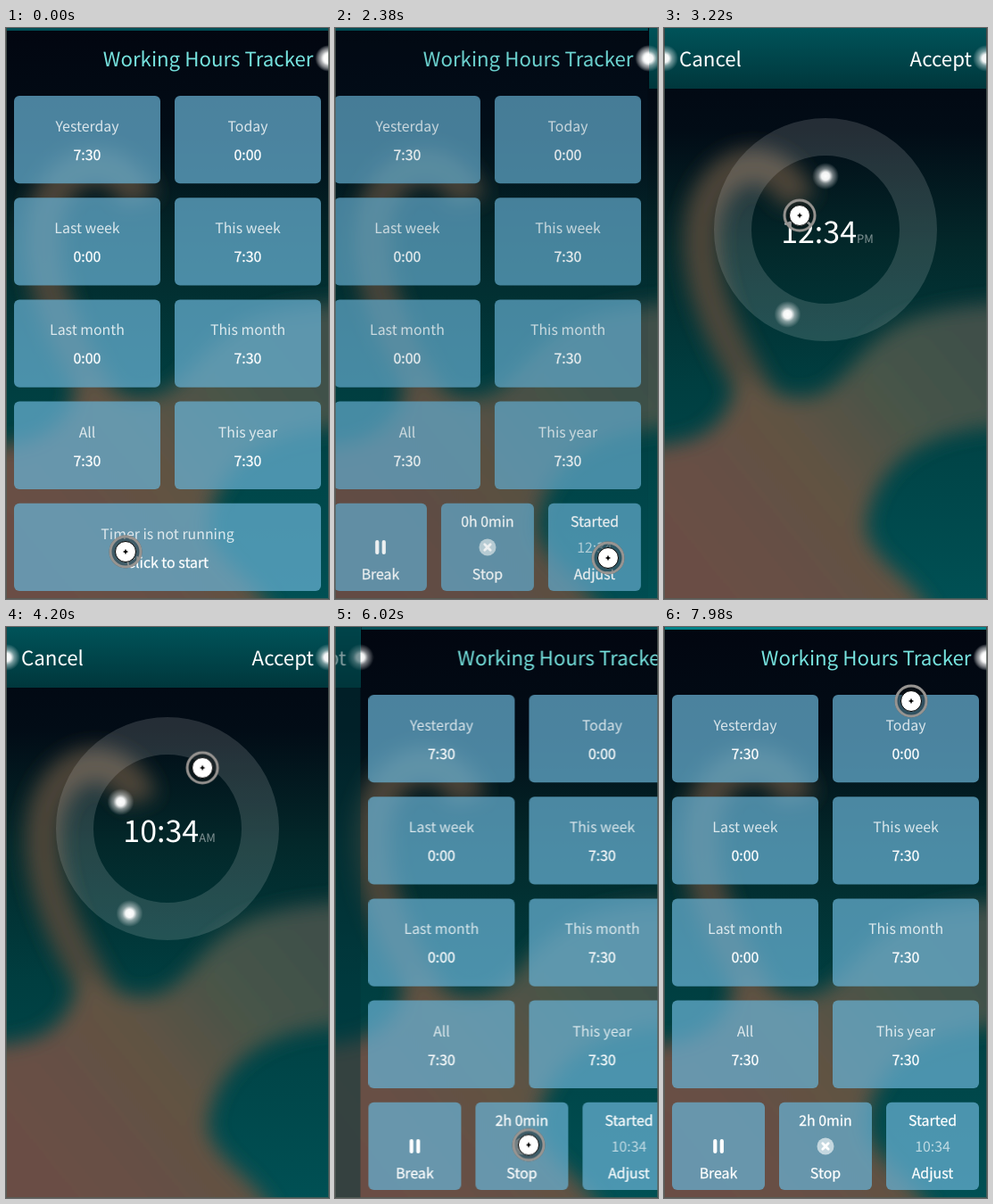
An HTML page for the animation above (8 s loop, 362 by 640 pixels).

```html
<!DOCTYPE html>
<html lang="en">
<head>
<meta charset="utf-8">
<title>Working Hours Tracker</title>
<style>
html, body { margin: 0; width: 100%; height: 100%; overflow: hidden; background: #02080f; }
svg { display: block; width: 362px; height: 640px; overflow: hidden; }
text { font-family: "Noto Sans CJK JP", "Noto Sans CJK SC", "Noto Sans CJK", "Open Sans", sans-serif; font-size: 15.9px; fill: #fff; text-rendering: geometricPrecision; }
.mid { text-anchor: middle; }
.end { text-anchor: end; }
.thin { font-weight: 300; fill-opacity: .8; }
.value { stroke: #fff; stroke-width: .25px; }
.dim { fill-opacity: .65; }
.head { font-size: 22.3px; font-weight: 300; }
.title { fill: #76e2de; }
.time { font-size: 34px; font-weight: 300; }
.ampm { font-size: 13px; fill-opacity: .5; }
.card { fill: rgba(104, 178, 212, .72); }
.press { fill: #00a0a8; fill-opacity: .45; }

/* One loop is 8 s: 1% = 80 ms */
#main, #dialog, .shade, #strip, #cursor { animation: 8s linear infinite; }
.idle, .run, .before, .after, .noon, .morning, .hour,
.press, #accept, .lit { animation: 8s step-end infinite; }

#main { animation-name: main; }
#dialog { animation-name: dialog; }
#main .shade { animation-name: shadeMain; }
#dialog .shade { animation-name: shadeDialog; }
#strip { animation-name: strip; }
#cursor { animation-name: cursor; }
.idle { animation-name: idle; }
.run { animation-name: run; }
.before { animation-name: before; }
.after { animation-name: after; }
.noon { animation-name: noon; }
.morning { animation-name: morning; }
.hour { animation-name: hour; }
.press.start { animation-name: pressStart; }
.press.adjust { animation-name: pressAdjust; }
#accept { animation-name: accept; }
.lit { animation-name: lit; }

@keyframes main {
  0% { transform: none; }
  29.06% { transform: translateX(0); animation-timing-function: cubic-bezier(.455, .03, .515, .955); }
  35.31% { transform: translateX(-362px); animation-timing-function: step-end; }
  50% { transform: translateX(362px); }
  70.26% { transform: translateX(360px); animation-timing-function: cubic-bezier(.455, .03, .515, .955); }
  76.51%, 100% { transform: translateX(0); }
}
@keyframes dialog {
  0%, 29.06% { transform: translateX(361px); animation-timing-function: cubic-bezier(.455, .03, .515, .955); }
  35.31% { transform: translateX(0); }
  70.26% { transform: translateX(0); animation-timing-function: cubic-bezier(.455, .03, .515, .955); }
  76.51% { transform: translateX(-361px); animation-timing-function: step-end; }
  90%, 100% { transform: translateX(361px); }
}
@keyframes shadeMain {
  0%, 29.06% { opacity: 0; }
  35.31% { opacity: .62; animation-timing-function: step-end; }
  50%, 100% { opacity: 0; }
}
@keyframes shadeDialog {
  0%, 70.26% { opacity: 0; }
  76.51% { opacity: .62; animation-timing-function: step-end; }
  90%, 100% { opacity: 0; }
}
@keyframes strip { 0%, 78.5% { opacity: .58; } 85%, 100% { opacity: 1; } }
@keyframes idle { 0% { opacity: 1; } 9.625%, 100% { opacity: 0; } }
@keyframes run { 0% { opacity: 0; } 9.625%, 100% { opacity: 1; } }
@keyframes before { 0% { opacity: 1; } 50%, 100% { opacity: 0; } }
@keyframes after { 0% { opacity: 0; } 50%, 100% { opacity: 1; } }
@keyframes noon { 0% { opacity: 1; } 45.5%, 100% { opacity: 0; } }
@keyframes morning { 0% { opacity: 0; } 45.5%, 100% { opacity: 1; } }
@keyframes hour {
  0% { transform: translate(181px, 166px); }
  45.5% { transform: translate(128.5px, 196px) scale(1.8); }
  46.375%, 100% { transform: translate(128.5px, 196px); }
}
@keyframes pressStart { 0% { opacity: 0; } 8.75% { opacity: 1; } 9.625%, 100% { opacity: 0; } }
@keyframes pressAdjust { 0% { opacity: 0; } 26.25% { opacity: 1; } 28%, 100% { opacity: 0; } }
@keyframes accept { 0% { opacity: 0; } 68.25% { opacity: 1; } 70%, 100% { opacity: 0; } }
@keyframes lit { 0% { fill: #fff; } 68.25% { fill: #74d6d6; } 70%, 100% { fill: #fff; } }
@keyframes cursor {
  0%, 1.75% { transform: translate(134px, 587px); }
  4.375%, 11.375% { transform: translate(161px, 574.5px); }
  13.1% { transform: translate(166px, 593px); animation-timing-function: step-end; }
  14%, 18.4% { transform: translate(300px, 670px); }
  23.6%, 30% { transform: translate(306px, 594px); }
  33.25% { transform: translate(266px, 451px); }
  38% { transform: translate(172px, 224px); }
  42.875%, 48.1% { transform: translate(129px, 194px); }
  52.5% { transform: translate(220px, 158px); }
  58.625% { transform: translate(292px, 64px); }
  62.125%, 69.9% { transform: translate(306px, 39px); }
  74.8%, 78% { transform: translate(217px, 580.5px); }
  91% { transform: translate(258px, 297px); }
  99.75%, 100% { transform: translate(277px, 83px); }
}
</style>
</head>
<body>
<svg viewBox="0 0 362 640">
  <defs>
    <linearGradient id="night" x2="0" y2="1">
      <stop offset="0" stop-color="#020610"/>
      <stop offset=".18" stop-color="#020c16"/>
      <stop offset=".38" stop-color="#03282a"/>
      <stop offset=".62" stop-color="#003e40"/>
      <stop offset="1" stop-color="#005054"/>
    </linearGradient>
    <linearGradient id="earth" gradientUnits="userSpaceOnUse" x1="20" y1="600" x2="340" y2="340">
      <stop offset="0" stop-color="#6b4e45"/>
      <stop offset=".45" stop-color="#615243"/>
      <stop offset=".75" stop-color="#465448"/>
      <stop offset="1" stop-color="#3f5049"/>
    </linearGradient>
    <linearGradient id="bar" x2="0" y2="1">
      <stop offset="0" stop-color="#005359"/>
      <stop offset="1" stop-color="#00373c"/>
    </linearGradient>
    <linearGradient id="barLit" x2="0" y2="1">
      <stop offset="0" stop-color="#00868c"/>
      <stop offset="1" stop-color="#00767c"/>
    </linearGradient>
    <radialGradient id="light">
      <stop offset="0" stop-color="#fff"/>
      <stop offset=".3" stop-color="#fff" stop-opacity=".95"/>
      <stop offset=".55" stop-color="#fff" stop-opacity=".45"/>
      <stop offset="1" stop-color="#fff" stop-opacity="0"/>
    </radialGradient>
    <filter id="soft" filterUnits="userSpaceOnUse" x="-60" y="0" width="480" height="720">
      <feGaussianBlur stdDeviation="11"/>
    </filter>
    <circle id="glow" r="15" fill="url(#light)"/>
  </defs>

  <rect width="362" height="640" fill="url(#night)"/>
  <g filter="url(#soft)">
    <path d="M150 195C132 140 62 138 44 210C32 280 66 350 112 425" fill="none" stroke="#54493c" stroke-width="40" stroke-opacity=".9"/>
    <path d="M-40 468C40 472 72 450 84 385C125 415 160 425 190 400C235 360 240 310 400 308V446C310 446 236 476 226 560C238 612 296 612 315 700H-40Z" fill="url(#earth)"/>
  </g>

  <g id="main">
    <rect id="strip" x="1" width="360" height="3" fill="#008389"/>
    <text class="head title end" x="344.5" y="43">Working Hours Tracker</text>
    <g id="cards"></g>
    <use href="#glow" x="361" y="34"/>
    <rect class="shade" x="1" width="360" height="640" fill="#00343a"/>
  </g>

  <g id="dialog">
    <rect x="1" width="360" height="68" fill="url(#bar)"/>
    <rect id="accept" x="181" width="180" height="68" fill="url(#barLit)"/>
    <text class="head" x="17" y="43">Cancel</text>
    <text class="head end lit" x="345" y="43">Accept</text>
    <use href="#glow" x="1" y="34"/>
    <use href="#glow" x="361" y="34"/>
    <circle cx="181" cy="226" r="104" fill="none" stroke="#fff" stroke-opacity=".14" stroke-width="42"/>
    <use href="#glow" x="138.5" y="321"/>
    <g class="hour"><use href="#glow"/></g>
    <text class="time mid noon" x="183" y="241">12:34<tspan class="ampm">PM</tspan></text>
    <text class="time mid morning" x="183" y="241">10:34<tspan class="ampm">AM</tspan></text>
    <rect class="shade" x="1" width="360" height="640" fill="#00343a"/>
  </g>

  <path d="M.5 0V639.5H361.5V0" fill="none" stroke="#56605a" stroke-opacity=".75"/>

  <g id="cursor">
    <circle r="18.5" fill="#101414" fill-opacity=".45"/>
    <circle r="17" fill="none" stroke="#979491" stroke-width="3"/>
    <circle r="11.5" fill="#fff" stroke="#000" stroke-width="1"/>
    <path d="M0-3.2L1 -1L3.2 0L1 1L0 3.2L-1 1L-3.2 0L-1-1Z"/>
  </g>
</svg>
<script>
const card = (x, y, w, cls = 'card') =>
  `<rect class="${cls}" x="${x}" y="${y}" width="${w}" height="98.3" rx="6"/>`;
const label = (x, y, str, cls) => `<text class="mid ${cls}" x="${x}" y="${y}">${str}</text>`;
const tile = (x, y, w, name, value) =>
  card(x, y, w) + label(x + w / 2, y + 40, name, 'thin') + label(x + w / 2, y + 72, value, 'value');

const totals = [
  ['Yesterday', '7:30', 'Today', '0:00'],
  ['Last week', '0:00', 'This week', '7:30'],
  ['Last month', '0:00', 'This month', '7:30'],
  ['All', '7:30', 'This year', '7:30'],
];
const rowY = i => 76 + i * 114.2;
const bottom = rowY(4);

const grid = totals.map(([a, b, c, d], i) =>
  tile(9, rowY(i), 164, a, b) + tile(189, rowY(i), 164, c, d)).join('');

const idle = `<g class="idle">${tile(9, bottom, 344, 'Timer is not running', 'Click to start')}
  ${card(9, bottom, 344, 'press start')}</g>`;

const run = `<g class="run">
  ${[9, 129, 249].map(x => card(x, bottom, 104)).join('')}
  ${card(249, bottom, 104, 'press adjust')}
  <path d="M57.3 576V588M64.8 576V588" stroke="#fff" stroke-width="4.2" stroke-linecap="round"/>
  <circle cx="181" cy="582" r="9.5" fill="#fff" fill-opacity=".62"/>
  <path d="M177.8 578.8L184.2 585.2M184.2 578.8L177.8 585.2" stroke="#fff" stroke-width="2.8" stroke-linecap="round"/>
  ${label(181, 559, '0h 0min', 'value before')}
  ${label(181, 559, '2h 0min', 'value after')}
  ${label(301, 559, 'Started', 'value')}
  ${label(301, 588, '12:34', 'dim before')}
  ${label(301, 588, '10:34', 'dim after')}
  ${['Break', 'Stop', 'Adjust'].map((s, i) => label(61 + i * 120, 618, s, 'value')).join('')}
</g>`;

document.getElementById('cards').innerHTML = grid + idle + run;
</script>
</body>
</html>
```
